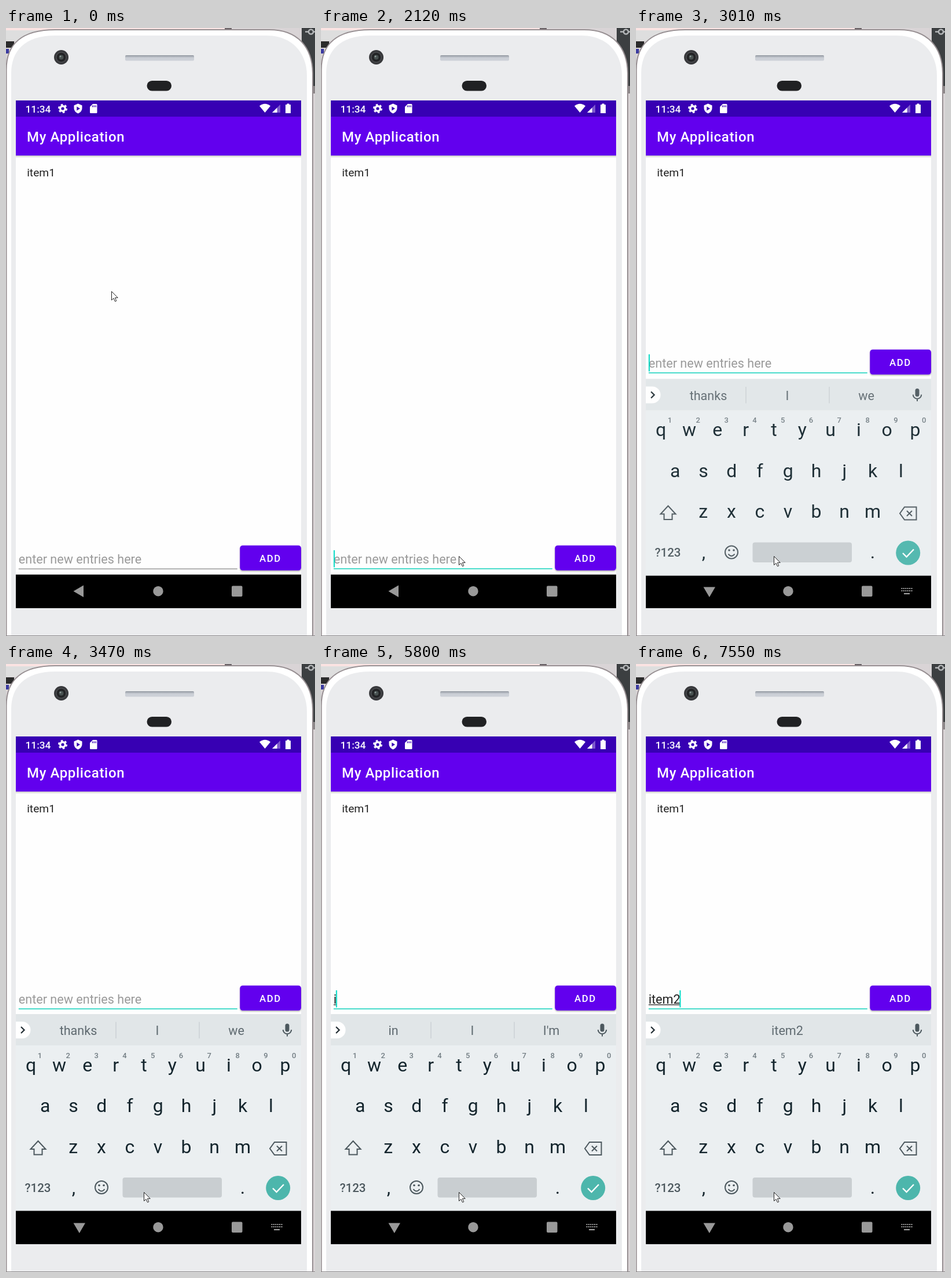
These frames come from a looping animation (534x1049 px, 7990 ms). An HTML page:

```html
<!DOCTYPE html>
<html lang="en">
<head>
<meta charset="utf-8">
<title>Adding a list item</title>
<style>
  html, body { margin: 0; width: 100%; height: 100%; overflow: hidden; background: #ebecee; }
  svg { display: block; width: 100vw; height: 100vh; }
  text { font-family: Roboto, sans-serif; white-space: pre; }
  .medium { font-weight: 500; }
  .mid { text-anchor: middle; }
  .word { font-size: 21.6px; fill: #5f6a70; }
  .key { font-size: 32px; fill: #14252d; }
  .digit { font-size: 13px; font-weight: 500; fill: #727d83; }
  .line { fill: none; stroke: #4c585e; stroke-width: 2; }
</style>
</head>
<body>
<svg viewBox="0 0 534 1049">
  <defs>
    <linearGradient id="slot" x2="0" y2="1">
      <stop offset="0" stop-color="#8a9099"/>
      <stop offset=".25" stop-color="#b2b7bf"/>
      <stop offset=".5" stop-color="#cbcfd6"/>
      <stop offset="1" stop-color="#cdd1d8"/>
    </linearGradient>
    <linearGradient id="shade" x2="0" y2="1">
      <stop offset="0" stop-color="#c6c6c6"/>
      <stop offset="1" stop-color="#fefefe"/>
    </linearGradient>
    <filter id="drop" x="-10%" y="-10%" width="120%" height="140%">
      <feDropShadow dx="0" dy="1.5" stdDeviation="1" flood-opacity=".35"/>
    </filter>
  </defs>

  <!-- desktop behind the phone -->
  <rect width="534" height="1049" fill="#d9d4d6"/>
  <rect width="380" height="4" fill="#fbe3e2"/>
  <rect y="4" width="60" height="18" fill="#dedede"/>
  <rect y="23" width="14" height="11" fill="#2b2b2b"/>
  <rect y="36" width="5" height="8" fill="#3a3aa0"/>
  <rect x="378" width="12" height="4" fill="#6c6468"/>
  <rect x="511" width="23" height="100" fill="#3c3f41"/>
  <g fill="none" stroke="#b4b6b8" stroke-width="2.500">
    <circle cx="527" cy="6.500" r="4"/>
    <path d="M517 6.500h6m8 0h4"/>
  </g>
  <rect x="528" y="100" width="6" height="13" fill="#8d8789"/>

  <!-- phone -->
  <path d="M.5 1050V72C.5 30 25 3 85 3H455C505 3 529.500 34 530 78V1050" fill="#fff" stroke="#978f92" stroke-width="2"/>
  <path d="M9 1049V78C9 40 32 13 85 13H450C496 13 520 45 520 82V1049Z" fill="#ebecee"/>
  <path d="M0 1048.500H534" stroke="#8a8789"/>
  <circle cx="95.500" cy="50.500" r="12.500" fill="#38393c"/>
  <circle cx="95.500" cy="50.500" r="8.500" fill="#222325" stroke="#5a5c5f"/>
  <circle cx="95.500" cy="50.500" r="4" fill="#47504f"/>
  <circle cx="94" cy="49" r="1.500" fill="#8b9895"/>
  <rect x="206" y="47" width="119" height="9.500" rx="2" fill="url(#slot)"/>
  <rect x="243.500" y="91" width="42.500" height="17.500" rx="8.700" fill="#202123"/>

  <!-- app -->
  <rect x="17" y="125" width="493" height="876" fill="#fefefe"/>
  <rect x="17" y="125" width="493" height="28" fill="#3700b3"/>
  <rect x="17" y="153" width="493" height="67" fill="#6200ee"/>
  <rect x="17" y="220" width="493" height="4" fill="url(#shade)"/>
  <g fill="#fff">
    <text class="medium" x="33.500" y="145.500" font-size="17.300">11:34</text>
    <circle cx="98" cy="139" r="4.300" fill="none" stroke="#fff" stroke-width="3.400"/>
    <circle cx="98" cy="139" r="6.800" fill="none" stroke="#fff" stroke-width="2.400" stroke-dasharray="3.600 3.520"/>
    <path d="M124.500 130.500L131.500 133.500V138C131.500 142.500 128.500 146 124.500 147.500C120.500 146 117.500 142.500 117.500 138V133.500Z"/>
    <path d="M122.300 135.500V142.500L128 139Z" fill="#3700b3"/>
    <path d="M150 131H156Q157.500 131 157.500 132.500V145.500Q157.500 147 156 147H146.500Q145 147 145 145.500V136Z"/>
    <path d="M149.500 133.500v3m2.800-3v3m2.800-3v3" stroke="#3700b3" stroke-width="1.400"/>
    <path d="M447.500 146L438 134.500Q447.500 127 457 134.500Z"/>
    <path d="M460 146H474V132Z" opacity=".35"/>
    <path d="M460 146H468.500V137.500Z"/>
    <path d="M485.500 130.500h4v1.700h2.500V147h-9V132.200h2.500Z"/>
    <text class="medium" x="36" y="196" font-size="24" letter-spacing=".65">My Application</text>
  </g>
  <text x="36.200" y="256" font-size="19.200" fill="#212121">item1</text>

  <!-- entry row -->
  <g id="row">
    <rect id="rule" x="21.800" width="378"/>
    <text id="entry" x="21.800" y="924" font-size="21.600"></text>
    <rect id="under" x="21.800" y="925.300" height="1.300" fill="#212121"/>
    <rect id="caret" y="901" width="2" height="29.500" fill="#03dac5"/>
    <rect x="404.300" y="892.800" width="105.700" height="43" rx="4.800" fill="#6200ee" filter="url(#drop)"/>
    <text class="medium" x="438" y="920.500" font-size="16.800" letter-spacing="1.500" fill="#fff">ADD</text>
  </g>

  <!-- navigation bar -->
  <rect x="17" y="943" width="493" height="58"/>
  <g fill="#999">
    <path id="back"/>
    <circle cx="263" cy="971.700" r="8.700"/>
    <rect x="390" y="962.500" width="18.500" height="18.500" rx="2"/>
    <g id="switcher" fill="none" stroke="#a6a6a6" stroke-width="2">
      <path d="M458.500 967h19M458.500 971h19" stroke-dasharray="2 1.400"/>
      <path d="M463 976h10"/>
    </g>
  </g>

  <!-- keyboard -->
  <g id="keyboard">
    <rect x="17" y="604" width="493" height="339.500" fill="#ebeff1"/>
    <rect x="17" y="604" width="493" height="54" fill="#e1e6e8"/>
    <path d="M17 617H28A14.500 14.500 0 0 1 28 646H17Z" fill="#fff"/>
    <path d="M26 626L31.500 631.500L26 637" fill="none" stroke="#263238" stroke-width="2.300"/>
    <path id="bars" d="M190 617.500V646M334 617.500V646" stroke="#c6ccd0" stroke-width="1.200"/>
    <g id="words"></g>
    <rect x="482.500" y="620.500" width="7" height="14" rx="3.500" fill="#4c585e"/>
    <path class="line" d="M478.800 631a7.200 7.200 0 0 0 14.400 0M486 638v4.500"/>
    <g id="keys"></g>
    <path class="line" d="M55.500 823L68.500 837H62.500V846.500H48.500V837H42.500Z"/>
    <path class="line" d="M464 825H484.500V847H464L456 836ZM468 831.500l9 9m0-9l-9 9"/>
    <text class="mid medium" x="55" y="910.500" font-size="20.500" fill="#4c585e">?123</text>
    <circle class="line" cx="165" cy="903" r="11"/>
    <path class="line" d="M159.500 906Q165 913 170.500 906"/>
    <circle cx="161" cy="899.500" r="1.800" fill="#4c585e"/>
    <circle cx="169" cy="899.500" r="1.800" fill="#4c585e"/>
    <rect x="201.500" y="886" width="171.500" height="34.500" rx="4" fill="#c9ced1"/>
    <circle cx="470.200" cy="904" r="21" fill="#4db6ac"/>
    <path d="M461 904.500L467.500 911L480 898" fill="none" stroke="#fff" stroke-width="2.400"/>
  </g>

  <path id="mouse" d="M.5 .5V15.500L4 12.300L6.500 17.800L8.800 16.800L6.400 11.400H11.200Z" fill="#fff" stroke="#222" stroke-width="1"/>
</svg>

<script>
const LOOP = 7990;
const FOCUS = 1860, RAISE = 2710, KEYS_IN = 3010, KEYS_SET = 3170, TYPING = 5800;
const $ = id => document.getElementById(id);

// Each track holds [start time, value...] and changes in hard steps.
const mouse = [
  [0, 182, 454], [160, 477, 760], [310, 427, 710], [740, 385, 762],
  [870, 330, 818], [1000, 277, 866], [1130, 242, 891], [1250, 241, 899],
  [1400, 240, 906], [1560, 239, 912], [1710, 238, 911]
];
const caret = [
  [0, 0], [1990, 1], [RAISE, 0], [KEYS_IN, 1], [3470, 0], [4060, 1],
  [4500, 0], [5090, 1], [5520, 0], [TYPING, 1]
];
const typed = [
  [0, ""], [TYPING, "i"], [6100, "it"], [6380, "ite"], [6810, "item"], [7400, "item2"]
];
const hints = [
  [0, "thanks", "I", "we"], [TYPING, "in", "I", "I'm"], [6100, "it's", "it", "its"],
  [6380, "ite", "it", "it's"], [6960, "items", "item", "itemized"], [7550, "", "item2", ""]
];
const at = (track, t) => track.filter(step => step[0] <= t).pop().slice(1);

function label(parent, cls, x, y, value = "") {
  const el = document.createElementNS("http://www.w3.org/2000/svg", "text");
  el.setAttribute("class", "mid " + cls);
  el.setAttribute("x", x);
  el.setAttribute("y", y);
  el.textContent = value;
  $(parent).append(el);
  return el;
}

function set(id, attrs) {
  for (const name in attrs) $(id).setAttribute(name, attrs[name]);
}

function setText(el, value) {
  if (el.textContent !== value) el.textContent = value;
}

const PITCH = 48.8;
[["qwertyuiop", 43.2], ["asdfghjkl", 67.6], ["zxcvbnm", 116.2]].forEach(([row, left], r) =>
  [...row].forEach((ch, i) => {
    label("keys", "key", left + i * PITCH, 702.5 + r * 70.5, ch);
    if (r === 0) label("keys", "digit", 58.5 + i * PITCH, 679.5, (i + 1) % 10);
  }));
label("keys", "key", 117, 913.5, ",");
label("keys", "key", 409, 913.5, ".");
const words = [125, 261.5, 398].map(x => label("words", "word", x, 640));

function draw(t) {
  const [text] = at(typed, t);
  const focused = t >= FOCUS, raised = t >= RAISE;
  const settling = t < KEYS_SET;

  set("row", { transform: `translate(0 ${raised ? -338 : 0})` });
  set("rule", focused
    ? { y: 932, height: 2, fill: "#4adccb" }
    : { y: 932.6, height: 1.3, fill: "#8a8a8a" });
  setText($("entry"), text || "enter new entries here");
  set("entry", { fill: text ? "#212121" : "#9a9a9a" });
  const width = text ? $("entry").getComputedTextLength() : 0;
  set("under", { width });
  set("caret", { x: 21.8 + Math.max(0, width - 1.3), opacity: at(caret, t)[0] });

  set("back", { d: raised ? "M116.500 964.500H137L126.800 982Z" : "M116.500 971.800L134 961.500V982Z" });
  set("switcher", { opacity: +raised });

  set("keyboard", {
    visibility: t >= KEYS_IN ? "visible" : "hidden",
    transform: `translate(0 ${settling ? 1.5 : 0})`,
    opacity: settling ? 0.95 : 1
  });
  const shown = at(hints, t);
  words.forEach((el, i) => setText(el, shown[i]));
  set("bars", { opacity: shown[0] ? 1 : 0 });

  set("mouse", { transform: `translate(${at(mouse, t).join(" ")})` });
}

const start = performance.now();
function tick() {
  draw((performance.now() - start) % LOOP);
  requestAnimationFrame(tick);
}
tick();
</script>
</body>
</html>
```
